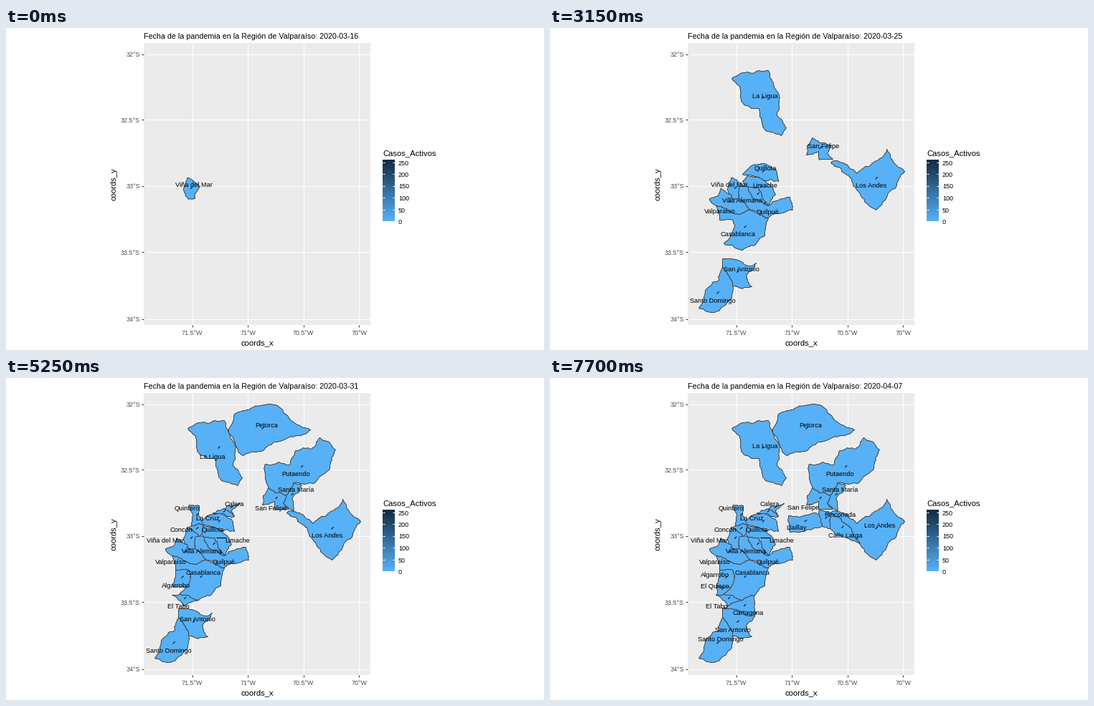
A matplotlib script for the animation above (8000 ms loop, 750 by 450 pixels).

```python
import math
import random

import matplotlib.pyplot as plt
from matplotlib.animation import FuncAnimation
from matplotlib.colors import LinearSegmentedColormap
from matplotlib.patches import Polygon, Rectangle

W, H, DPI = 750, 450, 100
PT = 72 / DPI
INTERVAL, FRAMES, FRAMES_PER_DAY = 50, 160, 7
LOW, HIGH = "#56B1F7", "#132B43"

plt.rcParams["font.family"] = "Liberation Sans"
fig = plt.figure(figsize=(W / DPI, H / DPI), dpi=DPI, facecolor="white")
ax = fig.add_axes([0, 0, 1, 1])
ax.axis("off")


def text(x, y, s, size, color="black", ha="left", **kw):
    return ax.text(x, y, s, fontsize=size * PT, color=color, ha=ha,
                   va="baseline", **kw)


def line(xs, ys, color, **kw):
    return ax.plot(xs, ys, color=color, lw=PT, solid_capstyle="butt", **kw)[0]


def split(p, q, rng):
    """Midpoint displacement between two corners, without the last point."""
    dx, dy = q[0] - p[0], q[1] - p[1]
    if math.hypot(dx, dy) < 3.5:
        return [(round(p[0]), round(p[1]))]
    off = rng.uniform(-.13, .13)
    mid = ((p[0] + q[0]) / 2 - dy * off, (p[1] + q[1]) / 2 + dx * off)
    return split(p, mid, rng) + split(mid, q, rng)


def border(a, b):
    """Rough edge that comes out the same for both neighbours."""
    p, q = sorted((a, b))
    pts = split(p, q, random.Random(f"{p}{q}")) + [q]
    return pts[:-1] if p == a else pts[:0:-1]


def centroid(pts):
    area = cx = cy = 0
    for (x0, y0), (x1, y1) in zip(pts, pts[1:] + pts[:1]):
        cross = x0 * y1 - x1 * y0
        area += cross
        cx += (x0 + x1) * cross
        cy += (y0 + y1) * cross
    return cx / area / 3, cy / area / 3


class Region:
    """A commune: its corners and its label stops (day, x, y)."""

    def __init__(self, name, corners, *stops):
        self.stops, self.center = stops, centroid(corners)
        self.half = 2.35 * len(name)
        outline = []
        for a, b in zip(corners, corners[1:] + corners[:1]):
            outline += border(a, b)
        self.shape = ax.add_patch(Polygon(
            [(x + .5, y + .5) for x, y in outline],
            fc=LOW, ec="#444444", lw=PT, zorder=3))
        self.leader = line([], [], "black", zorder=4)
        self.label = text(0, 0, name, 9.3, ha="center", zorder=5)

    def show(self, day):
        past = [s for s in self.stops if s[0] <= day]
        for art in (self.shape, self.leader, self.label):
            art.set_visible(bool(past))
        if not past:
            return
        _, x, y = past[-1]
        self.label.set_position((x, y + 3.6))
        cx, cy = self.center
        bx = min(max(cx, x - self.half), x + self.half)
        by = min(max(cy, y - 4), y + 4)
        if math.hypot(bx - cx, by - cy) <= 10:
            bx, by = cx + 3, cy - 3
        self.leader.set_data([cx, bx], [cy, by])


# Panel, grid and axes
ax.add_patch(Rectangle((192, 21), 316, 394, fc="#EBEBEB", ec="none", zorder=0))
for k in range(4):
    x = 259.5 + 77.5 * k
    line([x, x], [21, 415], "white", zorder=1)
    line([x, x], [415, 418], "#333333", zorder=1)
    text(x, 429, f"{71.5 - k / 2:g}°W", 8.9, "#4D4D4D", "center")
for k in range(5):
    y = 36.5 + 91.5 * k + .25 * k * k
    line([192, 508], [y, y], "white", zorder=1)
    line([189, 192], [y, y], "#333333", zorder=1)
    text(187, y + 4, f"{32 + k / 2:g}°S", 8.9, "#4D4D4D", "right")
text(350, 443, "coords_x", 11.2, ha="center")
text(155.5, 218, "coords_y", 11.2, ha="right", rotation=90).set_va("center")
title = text(192, 15, "", 10.65)

# Legend
text(525, 178, "Casos_Activos", 11.2)
ramp = LinearSegmentedColormap.from_list("cases", [HIGH, LOW])
ax.imshow([[k / 85] for k in range(86)], cmap=ramp, aspect="auto",
          extent=(525, 542, 270, 184), interpolation="nearest", zorder=2)
for v in range(0, 251, 50):
    y = 270 - v * .33
    for x in (525, 538.6):
        line([x, x + 3.4], [y, y], "white", zorder=3)
    text(547, y + 4, str(v), 9)

regions = [
    Region("Viña del Mar",
           [(252, 209), (270, 221), (263, 231), (263, 238), (254, 239),
            (247, 226)],
           (0, 262, 218), (9, 250, 218), (13, 222, 226)),
    Region("Quillota",
           [(268, 204), (285, 190), (299, 189), (314, 197), (318, 214),
            (297, 212)],
           (2, 300, 195), (10, 313, 199), (12, 288, 211)),
    Region("Valparaíso",
           [(222, 238), (234, 234), (238, 223), (252, 232), (254, 239),
            (263, 238), (279, 254), (256, 259), (231, 248)],
           (4, 254, 237), (9, 237, 255), (13, 230, 256)),
    Region("Quilpué",
           [(264, 221), (276, 222), (281, 236), (304, 248), (334, 236),
            (338, 254), (302, 265), (279, 254), (263, 238)],
           (4, 303, 240), (5, 291, 256), (9, 304, 256)),
    Region("Santo Domingo",
           [(240, 334), (254, 360), (250, 380), (225, 397), (207, 391),
            (216, 366), (235, 352)],
           (4, 238, 364), (5, 227, 380), (17, 238, 364)),
    Region("San Felipe",
           [(365, 153), (391, 163), (386, 174), (394, 183), (375, 184),
            (374, 172), (357, 177)],
           (7, 381, 164), (10, 369, 181), (21, 353, 180)),
    Region("San Antonio",
           [(240, 322), (281, 332), (287, 328), (273, 345), (281, 361),
            (254, 360), (240, 334)],
           (8, 267, 336), (17, 255, 351)),
    Region("Los Andes",
           [(469, 169), (478, 186), (494, 200), (482, 222), (454, 254),
            (432, 232), (414, 205), (391, 188), (395, 185), (427, 203),
            (461, 181)],
           (8, 448, 219), (19, 470, 219), (20, 460, 205)),
    Region("Casablanca",
           [(231, 248), (256, 259), (279, 254), (304, 265), (299, 290),
            (285, 303), (268, 310), (242, 301), (257, 275), (254, 268),
            (236, 268)],
           (9, 262, 287), (13, 275, 271), (16, 282, 271)),
    Region("La Ligua",
           [(253, 70), (304, 59), (319, 93), (316, 122), (329, 139),
            (322, 150), (298, 140), (291, 112), (270, 107), (263, 80)],
           (9, 300, 94), (12, 288, 109), (20, 300, 94)),
    Region("Limache",
           [(268, 214), (275, 206), (297, 212), (314, 232), (304, 248),
            (290, 223), (276, 222)],
           (9, 300, 219), (13, 323, 226)),
    Region("Villa Alemana",
           [(276, 222), (290, 223), (304, 248), (281, 236)],
           (9, 268, 240), (13, 273, 241)),
    Region("Putaendo",
           [(437, 83), (459, 100), (450, 128), (430, 146), (400, 146),
            (391, 163), (365, 153), (361, 120), (395, 121), (403, 101),
            (425, 99)],
           (10, 416, 117), (12, 404, 133), (17, 417, 117), (20, 404, 133)),
    Region("Calera",
           [(309, 178), (326, 175), (313, 185), (318, 193), (303, 182)],
           (10, 318, 175), (21, 306, 175)),
    Region("Quintero",
           [(255, 177), (269, 178), (275, 206), (258, 206), (260, 190)],
           (10, 256, 183), (13, 252, 181)),
    Region("Algarrobo",
           [(236, 268), (254, 268), (257, 275), (252, 292), (232, 290)],
           (11, 237, 289), (16, 230, 274)),
    Region("Petorca",
           [(310, 76), (318, 50), (338, 44), (380, 40), (398, 60),
            (424, 72), (391, 84), (358, 101), (330, 108), (319, 93)],
           (12, 363, 65)),
    Region("La Cruz",
           [(303, 182), (318, 193), (299, 189), (287, 189)],
           (13, 281, 195)),
    Region("Concón",
           [(258, 206), (275, 206), (270, 221), (252, 209)],
           (13, 244, 211)),
    Region("Santa María",
           [(400, 146), (412, 149), (398, 168), (400, 187), (386, 174),
            (391, 163)],
           (14, 404, 155)),
    Region("El Tabo",
           [(231, 303), (242, 301), (268, 310), (247, 318)],
           (14, 240, 318), (16, 232, 318)),
    Region("El Quisco",
           [(232, 290), (252, 292), (242, 301), (231, 303)],
           (16, 230, 290)),
    Region("Cartagena",
           [(247, 318), (268, 310), (285, 303), (287, 328), (281, 332),
            (240, 322)],
           (17, 276, 327)),
    Region("Calle Larga",
           [(391, 188), (414, 205), (432, 232), (390, 210)],
           (17, 400, 219), (20, 412, 219)),
    Region("Llaillay",
           [(332, 192), (379, 190), (379, 207), (334, 215)],
           (18, 344, 208)),
    Region("Rinconada",
           [(375, 184), (391, 188), (390, 210), (379, 207)],
           (21, 404, 190)),
]

ax.set_xlim(0, W)
ax.set_ylim(H, 0)


def draw(frame):
    day = frame // FRAMES_PER_DAY
    month, dom = (3, 16 + day) if day < 16 else (4, day - 15)
    title.set_text("Fecha de la pandemia en la Región de Valparaíso: "
                   f"2020-{month:02d}-{dom:02d}")
    for r in regions:
        r.show(day)
    return []


anim = FuncAnimation(fig, draw, frames=FRAMES, interval=INTERVAL,
                     repeat=True, repeat_delay=0)
plt.show()
```
